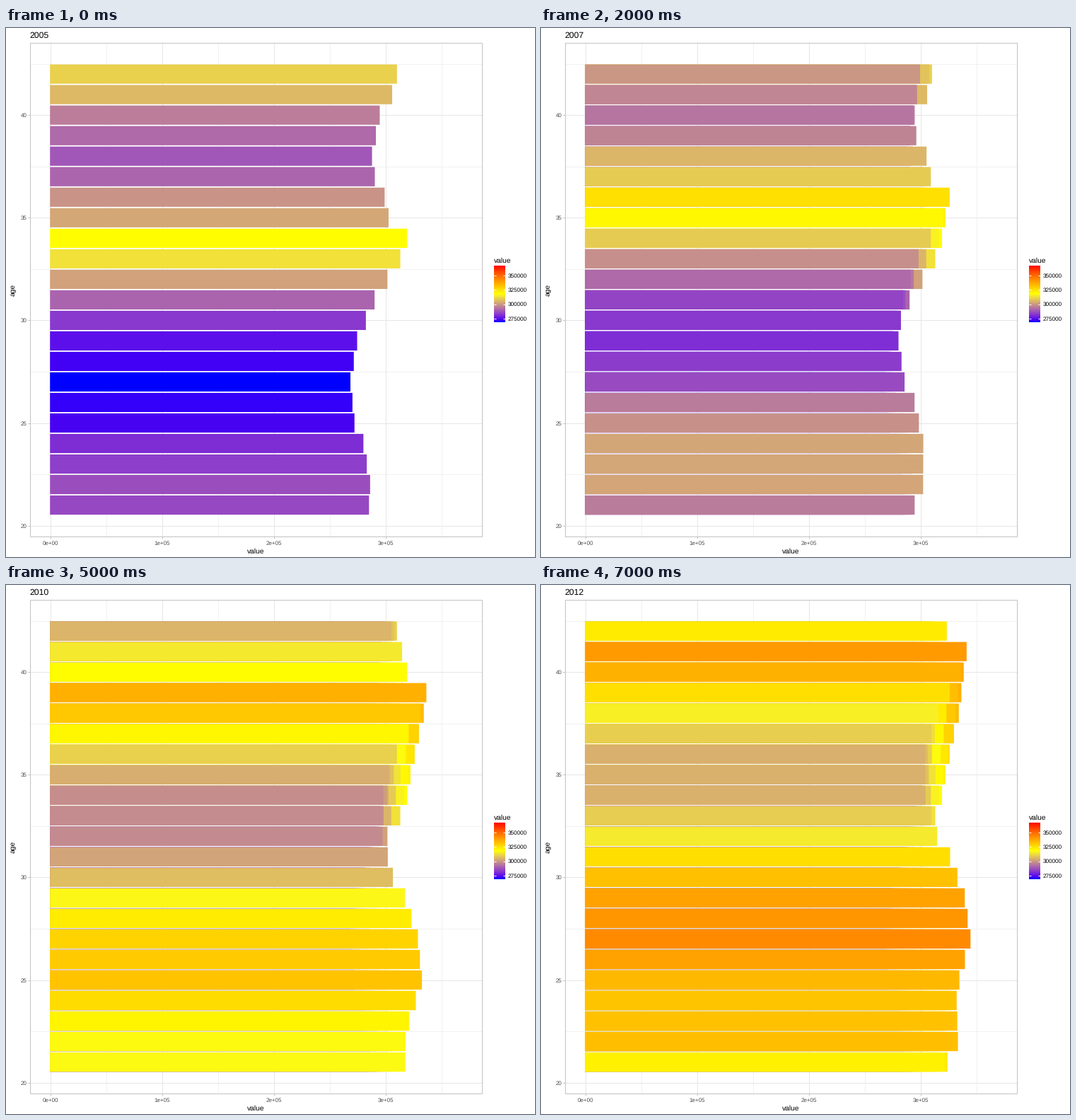
A matplotlib script that plays this animation: 748x748 px, repeating every 8000 ms.

```python
import numpy as np
import matplotlib.pyplot as plt
from matplotlib.animation import FuncAnimation
from matplotlib.collections import PolyCollection
from matplotlib.patches import Rectangle

SIZE, DPI = 748, 100
PT = 72 / DPI  # points per pixel
LEFT, TOP, RIGHT, BOTTOM = 34, 20, 674, 719
FIRST_YEAR, YEARS = 2005, 8
FIRST_AGE, LAST_AGE = 21, 42
LOW, MID, HIGH = 268.4, 318.6, 368.0  # colour scale, in thousands

# Key points of the first year's profile, as age: thousands.
# Ages below 21 come into view as the cohorts grow older.
PROFILE = {14: 240, 15: 255, 17: 261, 18: 267, 20: 284, 22: 286, 24: 280,
           25: 272, 27: 268.4, 29: 274.4, 31: 290, 33: 313, 34: 319, 35: 302.5,
           36: 299, 37: 290.2, 38: 287.7, 40: 294.6, 41: 305.7, 42: 310}
# Yearly gain of a 32-year-old cohort, in thousands.
PACE = [3.4, 4.3, 4.5, 5.2, 3.3, 3.3, 3.95]

plt.rcParams["font.family"] = "Liberation Sans"
plt.rcParams["text.hinting"] = "none"


def gain(age, pace):
    """Young cohorts grow faster in strong years, old ones slow down."""
    young = np.maximum(32 - age, 0)
    old = np.maximum(age - 32, 0)
    return pace + 0.34 * (pace - 2.5) * young - 0.17 * old


def yearly_values():
    """Age every cohort year by year and keep the ages on show."""
    age = np.arange(FIRST_AGE - YEARS + 1, LAST_AGE + 1)
    value = np.interp(age, list(PROFILE), list(PROFILE.values()))
    rows = []
    for pace in PACE + [0]:
        rows.append(value[(age >= FIRST_AGE) & (age <= LAST_AGE)])
        value, age = value + gain(age, pace), age + 1
    return rows


def colour(value):
    """Blue to yellow to red, with the bends of a perceptual blend."""
    t = np.clip((value - LOW) / (MID - LOW), 0, 1)
    u = np.clip((value - MID) / (HIGH - MID), 0, 1)
    red = t ** 0.48
    green = np.clip(1.07 * t - 0.07, 0, 1) * (1 - u) ** 0.83
    blue = (1 - t) ** 0.68
    return np.stack([red, green, blue], axis=-1)


def px(value):
    return 62.7 + 1.581 * value


def py(age):
    return 703.6 - 29.02 * (age - 20)


fig = plt.figure(figsize=(SIZE / DPI, SIZE / DPI), dpi=DPI, facecolor="white")
ax = fig.add_axes([0, 0, 1, 1])
ax.axis("off")


def line(x0, y0, x1, y1, col, z=1):
    ax.plot([x0, x1], [y0, y1], color=col, lw=PT, zorder=z,
            solid_capstyle="butt", snap=True)


def text(x, y, s, size, col="black", **kw):
    return ax.text(x, y, s, fontsize=size * PT, color=col, **kw)


def draw_panel():
    minor, major, border, grey = "#f1f1f1", "#e6e6e6", "#c2c2c2", "#4d4d4d"
    for v in range(50, 351, 100):
        line(px(v), TOP, px(v), BOTTOM, minor)
    for a in np.arange(22.5, 43, 5):
        line(LEFT, py(a), RIGHT, py(a), minor)
    for i in range(4):
        x = px(100 * i)
        line(x, TOP, x, BOTTOM, major)
        line(x, BOTTOM, x, BOTTOM + 3, border)
        text(x, 731.3, f"{i}e+05" if i else "0e+00", 8, grey, ha="center")
    for a in range(20, 41, 5):
        y = py(a)
        line(LEFT, y, RIGHT, y, major)
        line(LEFT - 3, y, LEFT, y, border)
        text(29.3, y + 3, a, 8, grey, ha="right")
    ax.add_patch(Rectangle((LEFT + .5, TOP + .5), RIGHT - LEFT - 1, BOTTOM - TOP - 1,
                           fill=False, ec=border, lw=PT, zorder=30))
    text(353.7, 743.3, "value", 10.2, ha="center")
    text(14.5, 370, "age", 10.2, rotation=90, ha="right", va="center")


def draw_legend():
    x0, x1, y0, y1 = 690, 706, 336, 416
    scale = colour(np.linspace(HIGH, LOW, y1 - y0))[:, None, :]
    ax.imshow(scale, extent=(x0, x1, y1, y0), aspect="auto",
              interpolation="nearest", zorder=2)
    for i in range(4):
        y = 350.2 + 20.2 * i
        line(x0, y, x0 + 3.2, y, "white", 3)
        line(x1 - 3.2, y, x1, y, "white", 3)
        text(709.8, y + 2.8, 350000 - 25000 * i, 8.1)
    text(689.6, 332, "value", 10.2)


def draw_bars(values, z):
    half, start = 13.6, 62.2
    boxes = []
    for age, end in enumerate(px(values), FIRST_AGE):
        top, bottom = py(age) - half, py(age) + half
        boxes.append([(start, top), (end, top), (end, bottom), (start, bottom)])
    bars = PolyCollection(boxes, facecolors=colour(values), linewidths=0,
                          zorder=z, snap=False)
    return ax.add_collection(bars, autolim=False)


draw_panel()
draw_legend()
ax.set_xlim(0, SIZE)
ax.set_ylim(SIZE, 0)
layers = [draw_bars(row, 5 + i) for i, row in enumerate(yearly_values())]
title = text(33.4, 14, "", 12.3)


def update(i):
    # Earlier years stay visible behind the current one.
    for k, layer in enumerate(layers):
        layer.set_visible(k <= i)
    title.set_text(str(FIRST_YEAR + i))
    return layers + [title]


anim = FuncAnimation(fig, update, frames=YEARS, interval=1000, repeat=True,
                     repeat_delay=0, blit=False)
plt.show()
```
